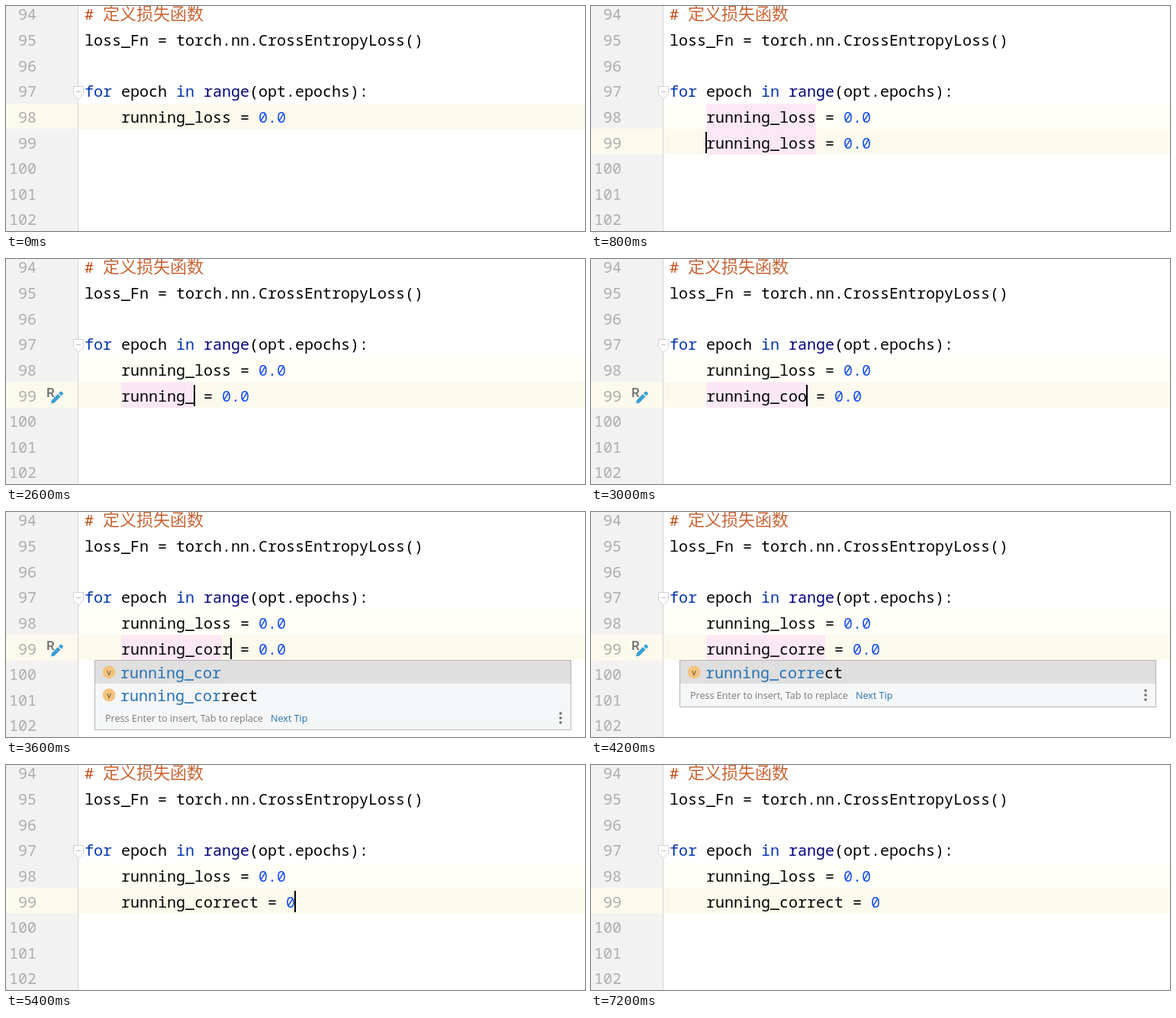
An HTML page that plays this animation: 759 by 295 pixels, repeating every 7400 ms.

```html
<!DOCTYPE html>
<html lang="en">
<head>
<meta charset="utf-8">
<title>Editor typing</title>
<style>
  html, body { margin: 0; width: 100%; height: 100%; overflow: hidden; background: #fff; }
  svg { display: block; }
  text { white-space: pre; }
  .code { font: 500 20px "Noto Sans Mono", "DejaVu Sans Mono", monospace; font-variant-ligatures: none; }
  .hanzi { font: 100 22px "Noto Sans CJK SC", "Noto Sans CJK", sans-serif; opacity: .85; }
  .hint { font: 12.6px "Open Sans", "Noto Sans", sans-serif; }
  .badge { font: 11px "Open Sans", sans-serif; }
  .refactor { font: 500 17px Roboto, sans-serif; }
</style>
</head>
<body>
<svg id="stage" width="759" height="295" viewBox="0 0 759 295"></svg>
<script>
const LOOP = 7400, CHAR = 12, LEFT = 103, INDENT = 151, FIRST = 94;
const INK = '#000', KEYWORD = '#0033b3', BUILTIN = '#000080', NUMBER = '#1750eb';
const COMMENT = '#bf4a12', MATCH = '#2470b3', CURRENT = '#fcfaed', PINK = '#fce8f4';

// name: identifier on line 99; mark: number of highlighted characters;
// popup: [matched prefix, ...suggestions]; caret: column after the indent
const STEPS = [
  { at: 0 },
  { at: 200, caret: 18 },
  { at: 800, name: 'running_loss', mark: 12, both: true, caret: 0 },
  { at: 1600, name: 'running_loss', mark: 12, both: true, caret: 12 },
  { at: 2200, name: 'running_los', mark: 11, edit: true, caret: 11 },
  { at: 2400, name: 'running_l', mark: 9, edit: true, caret: 9 },
  { at: 2600, name: 'running_', mark: 8, edit: true, caret: 8 },
  { at: 2800, name: 'running_co', mark: 9, edit: true, caret: 10,
    popup: ['running_c', 'running_c', 'running_correct'] },
  { at: 3000, name: 'running_coo', mark: 11, edit: true, caret: 11 },
  { at: 3400, name: 'running_co', mark: 10, edit: true, caret: 10 },
  { at: 3600, name: 'running_corr', mark: 11, edit: true, caret: 12,
    popup: ['running_cor', 'running_cor', 'running_correct'] },
  { at: 3800, name: 'running_corre', mark: 13, edit: true, caret: 13,
    popup: ['running_corre', 'running_correct'] },
  { at: 4200, name: 'running_corre', mark: 13, edit: true,
    popup: ['running_corre', 'running_correct'] },
  { at: 4600, name: 'running_correct', mark: 15, edit: true, caret: 15 },
  { at: 5000, name: 'running_correct', caret: 21 },
  { at: 5400, name: 'running_correct', value: '0', caret: 19 },
  { at: 7200, name: 'running_correct', value: '0' },
];

const baseline = line => Math.round(18.25 + 33.65 * (line - FIRST));
const rowTop = line => line === 98 ? 128 : 161;
const rowHeight = line => line === 98 ? 33 : 34;

const rect = (x, y, w, h, fill, extra = '') =>
  `<rect x="${x}" y="${y}" width="${w}" height="${h}" fill="${fill}" ${extra}/>`;
const text = (x, y, s, fill, cls = 'code', extra = '') =>
  `<text x="${x}" y="${y}" class="${cls}" fill="${fill}" ${extra}>${s}</text>`;

// Lays [string, colour] runs on the character grid.
function runs(x, y, parts) {
  let out = '';
  for (const [s, fill] of parts) {
    out += text(x, y, s, fill);
    x += s.length * CHAR;
  }
  return out;
}

const assignment = (line, name, value = '0.0') =>
  runs(INDENT, baseline(line), [[name, INK], [' = ', INK], [value, NUMBER]]);

const markName = (line, length) =>
  rect(INDENT, rowTop(line), length * CHAR, rowHeight(line), PINK);

const currentRow = line => rect(0, rowTop(line), 759, rowHeight(line), CURRENT);

function lineNumbers() {
  let out = '';
  for (let n = FIRST; n <= 102; n++)
    out += text(40, baseline(n), n, '#adadad', 'code', 'text-anchor="end"');
  return out;
}

const foldMarker =
  '<path d="M88.5 105.5h13v10l-6.5 7l-6.5-7z" fill="#fff" stroke="#cfcfcf"/>' +
  '<path d="M92 112.5h6" stroke="#b8b8b8"/>';

const header =
  text(LEFT, baseline(94), '#', COMMENT) +
  text(127, baseline(94), '定义损失函数', COMMENT, 'hanzi') +
  text(LEFT, baseline(95), 'loss_Fn = torch.nn.CrossEntropyLoss()', INK) +
  runs(LEFT, baseline(97), [['for', KEYWORD], [' epoch ', INK], ['in', KEYWORD],
    [' ', INK], ['range', BUILTIN], ['(opt.epochs):', INK]]);

const editIcon =
  text(53, 181, 'R', '#6e6e6e', 'refactor') +
  '<path d="M59 189.5l1-4.5l8-8l3.5 3.5l-8 8zM69 176l2-2q1-.8 2 0l1.5 1.5q.8 1 0 2l-2 2z" fill="#389fd6"/>';

function popup([prefix, ...items]) {
  const foot = 196 + items.length * 30;
  let out = rect(116.5, 194.5, 624, foot - 165, '#f5f6f7', 'stroke="#b5b5b5"') +
    rect(117, 195, 623, 30, '#dfdfdf');
  items.forEach((item, i) => {
    const y = 210 + i * 30;
    out += `<circle cx="135" cy="${y}" r="8.5" fill="#f3c47f"/>` +
      text(135, y + 4, 'v', '#5c431f', 'badge', 'text-anchor="middle"') +
      runs(150, y + 8, [[prefix, MATCH], [item.slice(prefix.length), INK]]);
  });
  out += text(130, foot + 19, 'Press Enter to insert, Tab to replace', '#7a7a7a', 'hint') +
    text(347, foot + 19, 'Next Tip', MATCH, 'hint');
  for (const dy of [8, 14, 20])
    out += `<circle cx="727" cy="${foot + dy}" r="1.8" fill="#6e6e6e"/>`;
  return out;
}

function scene(step) {
  const line = step.name ? 99 : 98;
  let out = rect(0, 0, 95, 295, '#f2f2f2');
  if (line === 99) out += rect(95, 128, 664, 33, '#fffff8');
  out += currentRow(line) + rect(94, 0, 1, 295, '#d4d4d4');
  if (step.both) out += markName(98, 12);
  if (step.mark) out += markName(99, step.mark);
  out += lineNumbers() + foldMarker + header + assignment(98, 'running_loss');
  if (step.name) out += assignment(99, step.name, step.value);
  if (step.edit) out += editIcon;
  if (step.caret !== undefined)
    out += rect(INDENT - 1 + step.caret * CHAR, rowTop(line) + (line === 98 ? 3 : 4), 2, 28, '#000');
  if (step.popup) out += popup(step.popup);
  return out;
}

const stage = document.getElementById('stage');
const start = performance.now();
let shown;

function draw(now) {
  const t = Math.max(0, now - start) % LOOP;
  const step = STEPS.findLast(s => s.at <= t);
  if (step !== shown) {
    stage.innerHTML = scene(step);
    shown = step;
  }
  requestAnimationFrame(draw);
}
draw(start);
</script>
</body>
</html>
```
